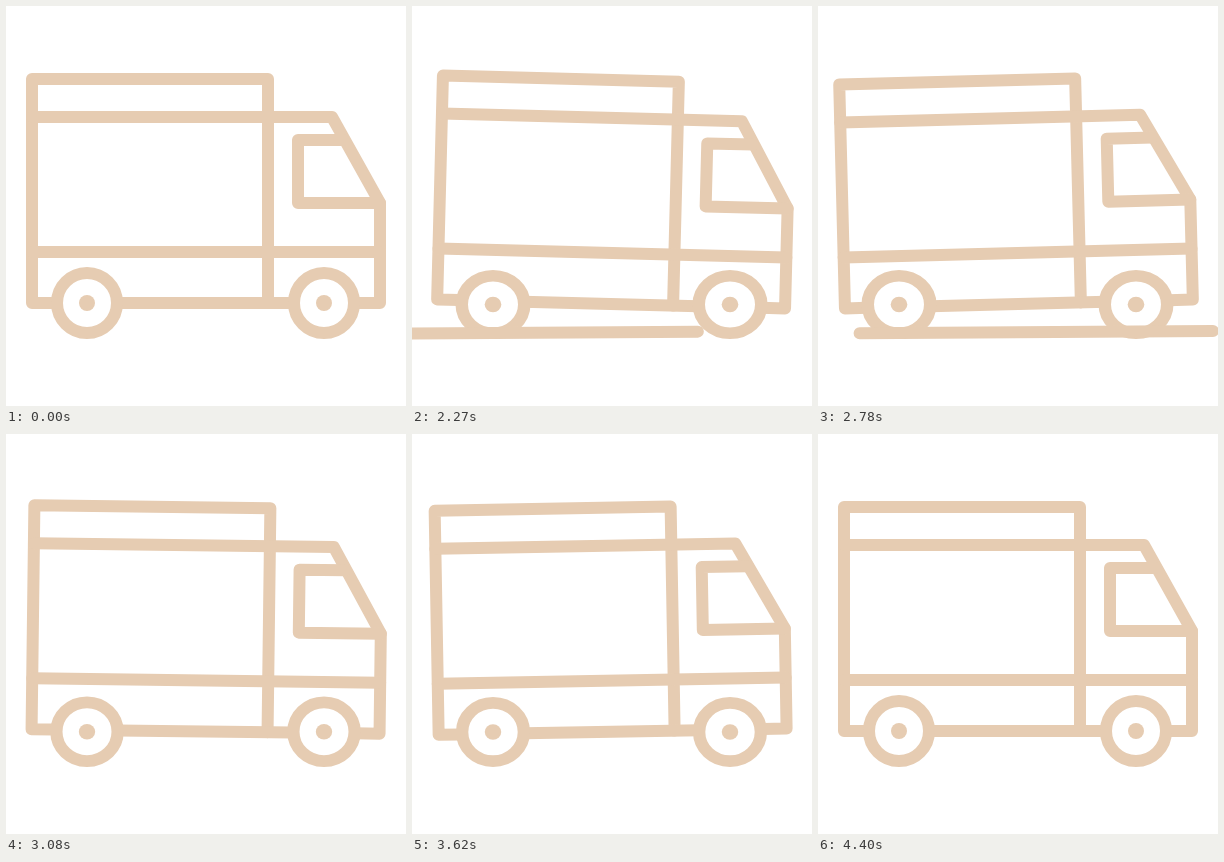
Write an HTML page that moves like this. It is 400x400 px and loops after 4430 ms.

```html
<!DOCTYPE html>
<html lang="en">
<head>
<meta charset="utf-8">
<title>Delivery truck</title>
<style>
  html, body { margin: 0; width: 100%; height: 100%; overflow: hidden; background: #fff; }
  svg { display: block; width: 100vw; height: 100vh; }
  .line { fill: none; stroke: #e6ccb2; stroke-width: 12; stroke-linecap: round; stroke-linejoin: round; }
  .tyre { fill: #fff; }
  .hub { fill: #e6ccb2; }
</style>
</head>
<body>
<svg viewBox="0 0 400 400">
  <g id="body" class="line">
    <path d="M48 297H26V73H262V297"/>
    <path d="M26 111H326L374 197V297H350"/>
    <path d="M26 246H374M112 297H287"/>
    <path d="M338 134H292V197H374"/>
  </g>
  <g class="wheel" data-x="81">
    <circle class="line tyre" cy="-36" r="30"/>
    <circle class="hub" cy="-36" r="8"/>
  </g>
  <g class="wheel" data-x="318">
    <circle class="line tyre" cy="-36" r="30"/>
    <circle class="hub" cy="-36" r="8"/>
  </g>
  <path id="road" class="line"/>
</svg>
<script>
const LOOP = 4430, STILL = 2030, STEP = 30, START = 2000;
const TILT = 1.49;

const body = document.getElementById('body');
const road = document.getElementById('road');
const wheels = [...document.querySelectorAll('.wheel')];

const clamp = u => Math.min(1, Math.max(0, u));
const sine = u => (1 - Math.cos(Math.PI * u)) / 2;
const easeIn = u => u ** 3;
const easeOut = u => 1 - (1 - u) ** 3;

// cubic-bezier(.4, 0, .2, 1), solved by bisection
function settle(u) {
  let lo = 0, hi = 1, s = 0.5;
  for (let i = 0; i < 20; i++) {
    s = (lo + hi) / 2;
    const x = 1.2 * s * (1 - s) ** 2 + 0.6 * s * s * (1 - s) + s ** 3;
    if (x < u) lo = s; else hi = s;
  }
  return s * s * (3 - 2 * s);
}

// [time, sway, easing towards this key]
const sway = [
  [0, 0], [250, 1, sine], [750, -1, sine], [1250, 1, sine],
  [1750, -1, sine], [2400, 0, settle]
];

function swayAt(t) {
  for (let i = 1; i < sway.length; i++) {
    const [t0, a] = sway[i - 1], [t1, b, ease] = sway[i];
    if (t < t1) return a + (b - a) * ease((t - t0) / (t1 - t0));
  }
  return 0;
}

const PASS = 600, PASSES = 3, RUN = 312;
const roadX = p => 420 - 440 * p;
const roadPoint = x => `${x} ${327.4 - 0.0062 * x}`;

function drawRoad(t) {
  const tau = t % PASS;
  const head = easeOut(clamp((tau - 30) / RUN));
  const tail = easeIn(clamp((tau - 60) / RUN));
  const shown = t < PASS * PASSES && head > tail;
  road.setAttribute('d', shown
    ? `M${roadPoint(roadX(tail))}L${roadPoint(roadX(head))}` : '');
}

function draw(now) {
  const time = now % LOOP;
  const t = time < STILL
    ? 0
    : STILL - START + STEP * Math.floor((time - STILL) / STEP);
  const k = swayAt(t), press = Math.abs(k);
  body.setAttribute('transform', `translate(0 ${press}) rotate(${TILT * k} 200 262)`);
  for (const w of wheels) {
    w.setAttribute('transform',
      `translate(${w.dataset.x} 333) scale(${1 + 0.042 * press} ${1 - 0.042 * press})`);
  }
  drawRoad(t);
}

const begin = performance.now();
function tick() {
  draw(performance.now() - begin);
  requestAnimationFrame(tick);
}
tick();
</script>
</body>
</html>
```
